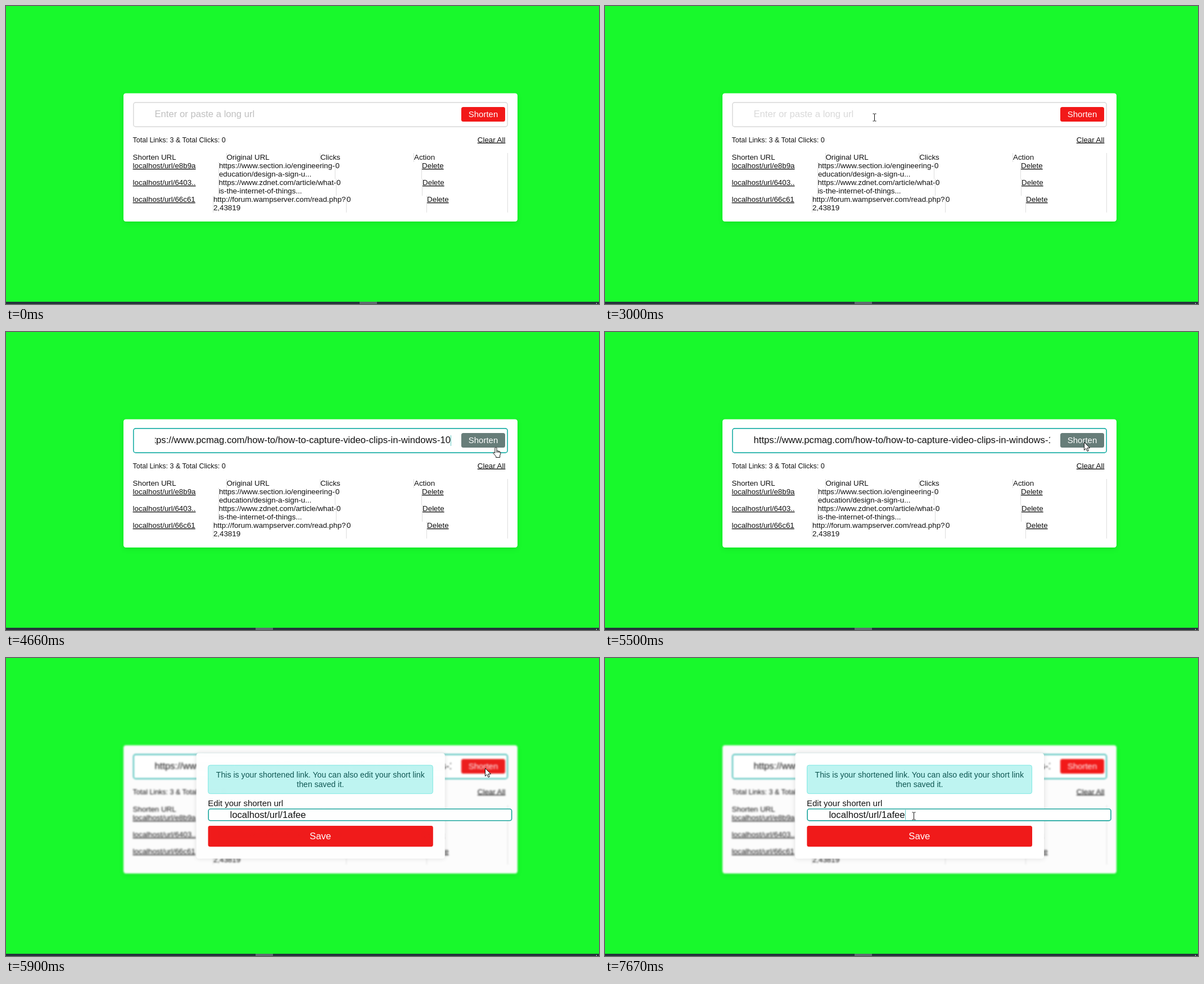
An HTML page for the animation above (8000 ms loop, 1055x531 px).

```html
<!DOCTYPE html>
<html lang="en">
<head>
<meta charset="utf-8">
<title>URL shortener</title>
<style>
  html, body { margin: 0; width: 100%; height: 100%; overflow: hidden; background: #18f92c; }
  svg { display: block; width: 100vw; height: 100vh; font: 13.333px "Liberation Sans", Arial, sans-serif; fill: #111; }
  .link { text-decoration: underline; }
  .big { font-size: 16.667px; }
  .mid { text-anchor: middle; }
  .card { filter: drop-shadow(0 3px 4px rgba(0, 0, 0, .08)); }
  .panel { fill: #fff; filter: drop-shadow(0 0 5px rgba(0, 0, 0, .12)); }
  .field { fill: #fff; stroke-width: 1.67; }
  .caret { stroke: #20b2aa; stroke-width: 1; opacity: .7; }
  .cursor { fill: #fff; stroke: #111; stroke-width: 1; stroke-linejoin: round; }
</style>
</head>
<body>
<svg viewBox="0 0 1055 531" preserveAspectRatio="none">
  <defs><clipPath id="clip"><rect x="265" y="174" width="527" height="40"/></clipPath></defs>
  <rect width="1055" height="531" fill="#18f92c"/>
  <g id="page">
    <rect id="card" class="card" x="209" y="155.5" width="701" height="228.5" rx="4.2"/>
    <rect id="field" class="field" x="226.8" y="171.8" width="665.4" height="43.4" rx="4"/>
    <text id="hint" class="big" x="264.5" y="198">Enter or paste a long url</text>
    <g clip-path="url(#clip)"><text id="url" class="big" y="198">https://www.pcmag.com/how-to/how-to-capture-video-clips-in-windows-10</text></g>
    <path id="caret" class="caret"/>
    <rect id="button" x="810" y="180" width="78" height="26" rx="3.5"/>
    <text class="mid" x="849" y="197.6" font-size="15" fill="#fff">Shorten</text>
    <text x="225.5" y="242.5" font-size="12.5">Total Links: 3 &amp; Total Clicks: 0</text>
    <text class="link" x="838.8" y="242.5">Clear All</text>
    <g id="table"></g>
  </g>
  <path d="M0 527H1055V531H0Z" fill="#25343b"/>
  <rect id="task" y="527" width="31" height="4" fill="#5f6b70"/>
  <path d="M1050 529h1v2h-1z" fill="#cdd3d5"/>
  <g id="popup">
    <rect class="panel" x="338.5" y="169.5" width="442.5" height="188" rx="4.2"/>
    <rect x="359.5" y="191" width="400" height="50.7" rx="3.5" fill="#bef4f1" stroke="#7de8e3"/>
    <g class="mid" font-size="14.167" fill="#0f5753">
      <text x="559.3" y="213">This is your shortened link. You can also edit your short link</text>
      <text x="559.3" y="229.7">then saved it.</text>
    </g>
    <text x="359" y="264" font-size="15">Edit your shorten url</text>
    <rect class="field" x="360" y="269" width="540" height="20.8" rx="3.5" stroke="#1fa79f"/>
    <text class="big" x="398.4" y="285.4">localhost/url/1afee</text>
    <path id="caret2" class="caret" d="M534.5 270.5V288.5"/>
    <rect x="359.3" y="299" width="400.7" height="37.2" rx="3.5" fill="#f01a1a"/>
    <text class="big mid" x="559.3" y="323.4" fill="#fff">Save</text>
  </g>
  <path id="cursor" class="cursor"/>
</svg>
<script>
const $ = id => document.getElementById(id);
const LOOP = 8000, RED = [242, 25, 25], GRAY = [103, 125, 121];

// Each row: top, divider positions, short link, two lines of the long link, action position.
const rows = [
  [278, [378.5, 585.5, 739.5], 'localhost/url/e8b9a', 'https://www.section.io/engineering-', 'education/design-a-sign-u...'],
  [308, [378, 587.5, 740.5], 'localhost/url/6403..', 'https://www.zdnet.com/article/what-', 'is-the-internet-of-things...'],
  [338, [368.5, 605.5, 748.5], 'localhost/url/66c61', 'http://forum.wampserver.com/read.php?', '2,43819'],
];
const text = (x, y, s, cls = '') => `<text class="${cls}" x="${x}" y="${y}">${s}</text>`;
const lines = (xs, y, h) => `<path stroke="#ddd" d="${[...xs, 892.5].map(x => `M${x} ${y}v${h}`).join('')}"/>`;

$('table').innerHTML = lines([392.5, 559, 725.5], 262, 16) +
  ['Shorten URL', 'Original URL', 'Clicks', 'Action'].map((s, i) => text(225.6 + i * 166.8, 274, s)).join('') +
  rows.map(([y, xs, short, long1, long2]) => lines(xs, y, 30) +
    text(225.6, y + 11, short, 'link') +
    text(xs[0] + .4, y + 11, long1) + text(xs[0] + .4, y + 26, long2) +
    text(xs[1] + .6, y + 11, '0') + text(xs[2] + .6, y + 11, 'Delete', 'link')).join('');

const shapes = {
  arrow: 'M0 0V14L3.3 11 5.6 16 7.8 15 5.5 10.2H10Z',
  hand: 'M-1.6 1Q0-1 1.6 1V6L6.5 7.3Q8.7 8 8.4 11L7.2 14.5V18H.2V16L-4.6 10.4Q-4.6 7.6-1.6 10.2ZM1.6 6V9.5M4 7V9.5M6.3 7.4V10',
  beam: 'M-3-6.5H-1L0-5.8 1-6.5H3M-3 6.5H-1L0 5.8 1 6.5H3M0-6V6',
};

// Mouse moves: first step, last step, step count, end x, end y, power of the slow-down.
const moves = [
  [370, 370, 1, 1049, 530, 1],
  [520, 760, 4, 759, 383, 1],
  [1070, 1210, 3, 678, 339, 1],
  [1530, 1530, 1, 640, 316, 1],
  [1607, 2070, 7, 479, 198, 1.5],
  [3930, 4170, 4, 776, 117, 1],
  [4400, 4660, 4, 871, 205, 1],
  [4730, 5190, 7, 852, 196, 1],
  [6430, 6500, 2, 635, 261, 1],
  [6730, 7200, 7, 549, 281, 1.5],
];

function mouseAt(t) {
  let x = 1060, y = 536;
  for (const [start, end, n, toX, toY, power] of moves) {
    if (t < start) break;
    const gap = n > 1 ? (end - start) / (n - 1) : 1;
    const step = Math.min(n, Math.floor((t - start) / gap + 1e-6) + 1);
    const k = 1 - (1 - step / n) ** power;
    x += (toX - x) * k;
    y += (toY - y) * k;
  }
  return [x, y];
}

// The CSS "ease" curve.
function ease(p) {
  if (p <= 0) return 0;
  if (p >= 1) return 1;
  const bez = (s, a, b) => 3 * s * (1 - s) ** 2 * a + 3 * s * s * (1 - s) * b + s ** 3;
  let lo = 0, hi = 1;
  for (let i = 0; i < 20; i++) {
    const s = (lo + hi) / 2;
    if (bez(s, .25, .25) < p) lo = s; else hi = s;
  }
  return bez(lo, .1, 1);
}

function cursorKind(t, x, y) {
  if (t >= 5500) return t >= 6730 && x < 620 && y > 268 ? 'beam' : 'arrow';
  if (x > 809 && x < 889 && y > 179 && y < 207) return 'hand';
  return x > 227 && x < 809 && y > 171 && y < 216 ? 'beam' : 'arrow';
}

const show = (el, on) => el.style.display = on ? '' : 'none';
const urlWidth = $('url').getComputedTextLength();

function draw(t) {
  const focused = t >= 2450, pasted = t >= 3410, blurred = t >= 5640;

  $('page').style.filter = blurred ? 'blur(1.5px)' : 'none';
  $('card').setAttribute('fill', blurred ? '#fcfcfc' : '#fff');
  $('field').setAttribute('stroke', pasted ? '#1fb0a8' : '#ddd');
  $('hint').setAttribute('fill', focused ? '#d9d9d9' : '#bfbfbf');
  $('task').setAttribute('x', focused ? 444 : 629);
  show($('hint'), !pasted);
  show($('url'), pasted);
  $('url').setAttribute('x', t < 5500 ? 791 - urlWidth : 264.5);

  const blink = pasted ? t < 5190 && Math.floor((t - 3470) / 530) % 2 <= 0 : focused && t < 3000;
  show($('caret'), blink);
  $('caret').setAttribute('d', `M${pasted ? 791.5 : 265.5} 184V203`);

  const gray = ease((t - 4460) / 200) - ease((t - 5680) / 300);
  $('button').setAttribute('fill', `rgb(${RED.map((c, i) => Math.round(c + (GRAY[i] - c) * gray))})`);

  const k = ease((t - 5640) / 300), popup = $('popup');
  show(popup, k > 0);
  popup.setAttribute('opacity', k);
  popup.setAttribute('transform', `translate(559.8 263.5) scale(${.9 + .1 * k}) translate(-559.8 -263.5)`);
  show($('caret2'), t >= 7520);

  const [x, y] = mouseAt(t);
  $('cursor').setAttribute('d', shapes[cursorKind(t, x, y)]);
  $('cursor').setAttribute('transform', `translate(${Math.round(x) + .5} ${Math.round(y) + .5})`);
}

const begin = performance.now();
function tick() {
  draw((performance.now() - begin) % LOOP);
  requestAnimationFrame(tick);
}
tick();
</script>
</body>
</html>
```
